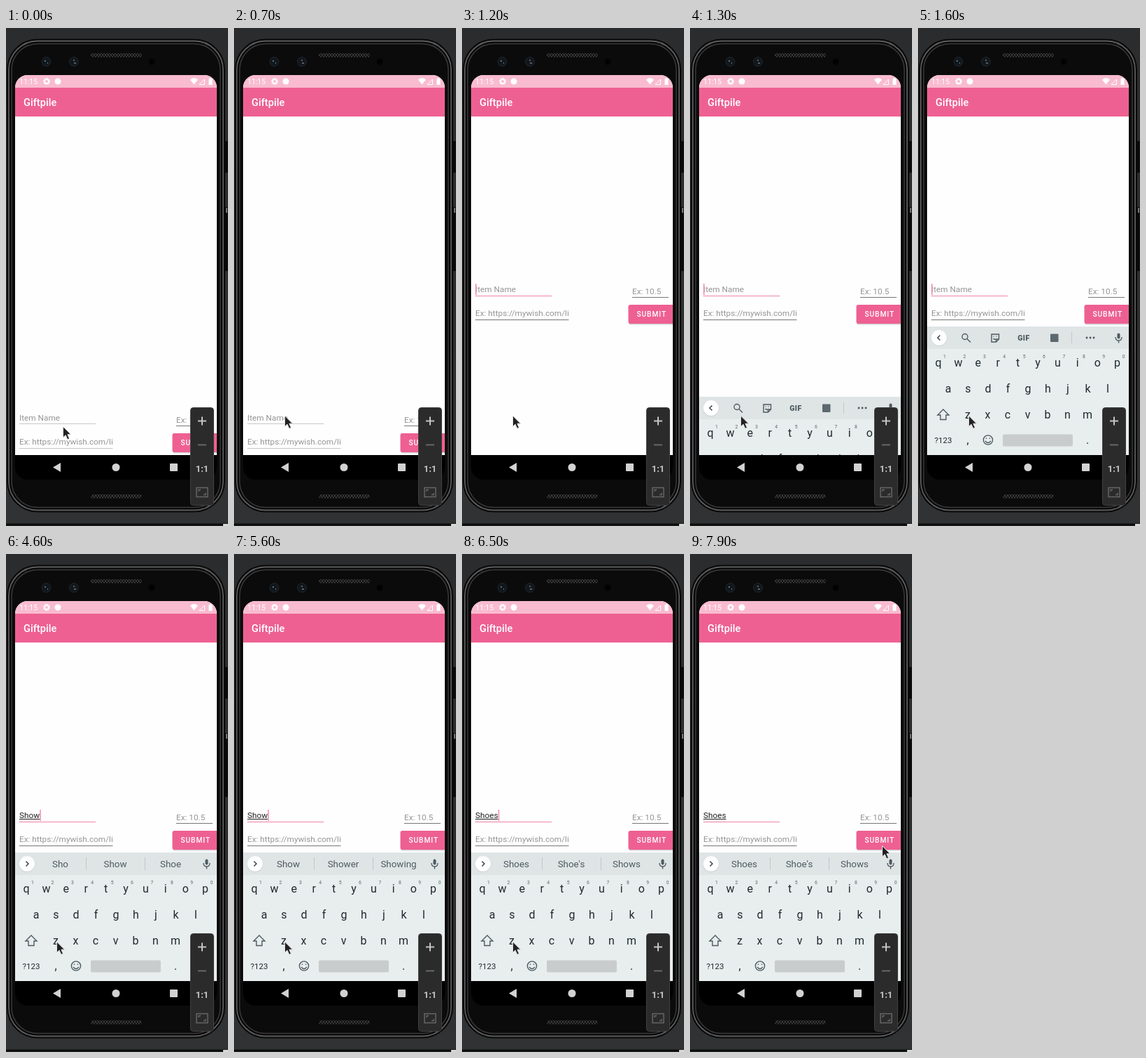
An HTML page that plays this animation: 317x709 px, repeating every 8000 ms.

```html
<!DOCTYPE html>
<html lang="en">
<head>
<meta charset="utf-8">
<style>
html, body { margin: 0; width: 100%; height: 100%; overflow: hidden; background: #2c2d2e; }
svg { display: block; width: 100%; height: 100%; }
text { font-family: Roboto, sans-serif; white-space: pre; }
.field { font-size: 11.8px; fill: #959595; }
.key { font-size: 16px; fill: #1f2b30; text-anchor: middle; }
.hint { font-size: 6.8px; fill: #5c696e; text-anchor: middle; }
.word { font-size: 13.4px; fill: #4d5b61; text-anchor: middle; }
.line { fill: none; stroke: #4d5b61; stroke-width: 1.4; }
</style>
</head>
<body>
<svg viewBox="0 0 317 709">
  <defs>
    <clipPath id="screen"><path d="M13 608V85a18 18 0 0 1 18-18H283a18 18 0 0 1 18 18V608z"/></clipPath>
    <clipPath id="urlBox"><rect x="19" y="575" width="133.5" height="30"/></clipPath>
    <pattern id="grille" width="4" height="5" patternUnits="userSpaceOnUse" y="1">
      <path d="M0 0L4 5M4 0L0 5" stroke="#505050" stroke-width=".8"/>
    </pattern>
    <linearGradient id="backdrop" x2="0" y2="1">
      <stop stop-color="#2b2c2d"/><stop offset="1" stop-color="#303233"/>
    </linearGradient>
  </defs>

  <!-- phone body -->
  <rect width="317" height="709" fill="url(#backdrop)"/>
  <path d="M0 707H317" stroke="#0c0c0c" stroke-width="3"/>
  <path d="M310 707.5h7" stroke="#d8d8d8" stroke-width="3"/>
  <path d="M314.5 161v45M314.5 255v91" stroke="#080808" stroke-width="4"/>
  <path d="M315 256v7" stroke="#777" stroke-width="2"/>
  <rect x="1" y="15.500" width="312" height="674" rx="44" fill="#080808"/>
  <rect x="4" y="18.500" width="306" height="668" rx="41" fill="none" stroke="#5c5c5c" stroke-width="1.800"/>
  <rect x="8" y="22.500" width="298" height="660" rx="37" fill="#0b0b0b" stroke="#3a3a3a" stroke-width="1.500"/>
  <rect x="121" y="36" width="73" height="5.500" rx="2.700" fill="url(#grille)"/>
  <rect x="121" y="664" width="73" height="5.500" rx="2.700" fill="url(#grille)"/>
  <g stroke="#20262b">
    <circle cx="57.500" cy="48" r="6.500" fill="#11171c"/>
    <circle cx="97" cy="48" r="6.500" fill="#11171c"/>
    <circle cx="208" cy="48" r="4.500" fill="#020202" stroke="#070707"/>
  </g>
  <path d="M55 47h2m2 3h1" stroke="#5b7181" stroke-width="2"/>
  <path d="M96 46h2m-1 4h3" stroke="#777" stroke-width="1.500"/>
  <path d="M13 600H301V625a18 18 0 0 1-18 18H31a18 18 0 0 1-18-18z"/>

  <!-- app screen -->
  <g clip-path="url(#screen)">
    <rect x="13" y="67" width="288" height="541" fill="#fefefe"/>
    <rect x="13" y="84" width="288" height="42" fill="#ee6092"/>
    <rect x="13" y="67" width="288" height="18" fill="#f9bbd0"/>
    <g fill="#fff">
      <text x="19" y="80" font-size="10.500">11:15</text>
      <circle cx="58" cy="76" r="3" fill="none" stroke="#fff" stroke-width="2"/>
      <circle cx="58" cy="76" r="4.200" fill="none" stroke="#fff" stroke-width="1.500" stroke-dasharray="1.700 1.600"/>
      <circle cx="74" cy="76" r="4.500"/>
      <path d="M263 73.500q5.500-4.500 11 0l-5.500 7z"/>
      <path d="M276 80.500h7.500v-7.500z" fill="none" stroke="#fff"/>
      <path d="M289.500 72h1.500v-1h2v1h1.500v9h-5z"/>
      <text x="25" y="111" font-size="14.600" font-weight="500">Giftpile</text>
    </g>
    <g id="form">
      <text id="itemHint" class="field" x="19" y="559">Item Name</text>
      <text id="item" class="field" x="19" y="559" style="fill:#222"></text>
      <path id="itemMark" stroke="#222"/>
      <path id="itemLine" d="M19 563.500H128"/>
      <path id="caret" stroke="#f490b0" stroke-width="1.600"/>
      <text class="field" x="243" y="562">Ex: 10.5</text>
      <path d="M243 566.500H295" stroke="#777"/>
      <text class="field" x="19" y="593" clip-path="url(#urlBox)">Ex: https://mywish.com/list</text>
      <path id="urlLine" d="M19 598.500H152.500"/>
      <rect x="238" y="578.500" width="70" height="27" rx="3" fill="#d4d4d4"/>
      <rect x="237.500" y="577" width="70" height="27" rx="3" fill="#ee6092"/>
      <text x="249.500" y="594" font-size="10.200" font-weight="500" letter-spacing=".91" fill="#fff">SUBMIT</text>
    </g>

    <g id="keyboard">
      <rect x="13" y="425" width="288" height="184" fill="#e8eded"/>
      <rect x="13" y="425" width="288" height="32" fill="#dfe4e5"/>
      <circle cx="30" cy="441.500" r="11.500" fill="#cdd2d3"/>
      <circle cx="30" cy="441" r="11" fill="#fff"/>
      <path id="chevron" fill="none" stroke="#3c484d" stroke-width="1.500"/>
      <g id="tools">
        <circle class="line" cx="67" cy="439.500" r="4"/>
        <path class="line" d="M70 442.500l5 5"/>
        <path class="line" d="M105 436h10.500v7l-4 4h-6.500zM111.500 447v-4h4M108 438.500v1m4-1v1M107.500 442q2 2 3.500 1"/>
        <text x="151" y="445" font-size="10.500" font-weight="900" text-anchor="middle" letter-spacing=".5" fill="#4d5b61">GIF</text>
        <rect x="189" y="435.500" width="11.500" height="11.500" rx="1" fill="#5b686d"/>
        <path d="M219.500 433v16" stroke="#c2c8ca"/>
        <path d="M241 441h.1m4.900 0h.1m4.900 0h.1" stroke="#4d5b61" stroke-width="2.800" stroke-linecap="round"/>
      </g>
      <g id="words">
        <path d="M114.500 432v18M198.500 432v18" stroke="#c2c8ca"/>
        <text class="word" x="77.500" y="446"></text>
        <text class="word" x="156" y="446"></text>
        <text class="word" x="235" y="446"></text>
      </g>
      <rect x="284.500" y="434.500" width="4" height="8" rx="2" fill="#4d5b61"/>
      <path class="line" d="M282 440q0 5 4.500 5t4.500-5M286.500 445v3.500"/>
      <g id="keys"></g>
      <path class="line" d="M36 543l8 8h-4v6.500h-8v-6.500h-4z"/>
      <text class="key" x="36" y="591" style="font-size:11.500px">?123</text>
      <circle class="line" cx="100" cy="586.500" r="6.600"/>
      <path class="line" d="M97.500 583.500v1.500m5-1.500v1.500M96 588q4 5 8 0"/>
      <rect x="121" y="578.500" width="100" height="17" rx="2" fill="#c8cccd"/>
    </g>
  </g>

  <!-- navigation bar -->
  <g fill="#d2d2d2">
    <path d="M67 625.500l11-6.500v13z"/>
    <circle cx="157" cy="625.500" r="5.500"/>
    <rect x="234" y="620" width="11" height="11" rx="1"/>
  </g>

  <!-- zoom panel -->
  <rect x="263.500" y="540.500" width="33" height="139" rx="4" fill="#2b2b2b" stroke="#414141"/>
  <path d="M274 559.500h12M280 553.500v12" stroke="#c4c4c4" stroke-width="2"/>
  <path d="M274 593.500h12" stroke="#666" stroke-width="2"/>
  <text x="280" y="632" font-size="13" font-weight="700" text-anchor="middle" fill="#c4c4c4">1:1</text>
  <path d="M272 654.500h16v13h-16zM275 660v-2.500h3M285 662v2.500h-3" fill="none" stroke="#666" stroke-width="1.500"/>

  <path id="pointer" d="M0 0V15.500L3.600 12.200L6.300 18.300L9 17.100L6.400 11.200H11.200Z" fill="#222" stroke="#e4e4e4" stroke-width="1"/>
</svg>
<script>
const LOOP = 8000, STEP = 100;
const $ = id => document.getElementById(id);
const set = (id, attrs) => {
  for (const name in attrs) $(id).setAttribute(name, attrs[name]);
};
const show = (id, on) => set(id, { visibility: on ? 'visible' : 'hidden' });
const latest = (list, t) => list.filter(([start]) => t >= start).pop()?.[1];
const progress = (t, from, to) => Math.min(1, Math.max(0, (t - from) / (to - from)));

const typed = [[0, ''], [4000, 'S'], [4200, 'Sh'], [4300, 'Sho'], [4600, 'Show'],
  [5700, 'Sho'], [6100, 'Shoe'], [6500, 'Shoes']];
const suggestions = [[4000, 'S So Some'], [4200, 'Sh She Show'], [4300, 'Sho Show Shoe'],
  [4800, 'Show Shower Showing'], [5700, 'Sho Show Shoe'], [6300, 'Shoe Shoes Shop'],
  [6500, "Shoes Shoe's Shows"]];
const caretOn = [[900, 1700], [2100, 2700], [3100, 3600], [4000, 5100], [5600, 7000], [7500, 7900]];
const keyboardDrop = [[0, 190], [1300, 100], [1400, 10], [1600, 0]];
const wordSlots = document.querySelectorAll('.word');

function keyRow(letters, x, y, gap, hints) {
  return [...letters].map((letter, i) => {
    const cx = x + i * gap;
    const hint = hints ? `<text class="hint" x="${cx + 9}" y="470">${(i + 1) % 10}</text>` : '';
    return `<text class="key" x="${cx}" y="${y}">${letter}</text>${hint}`;
  }).join('');
}
$('keys').innerHTML = keyRow('qwertyuiop', 29, 481.5, 28.4, true) +
  keyRow('asdfghjkl', 43, 518.5, 28.5) + keyRow('zxcvbnm', 71, 555.5, 28.5) +
  keyRow(',.', 71, 591.5, 171);

function pointerAt(t) {
  const first = progress(t, 100, 700), second = progress(t, 7200, 7900);
  const ease = second * second * (3 - 2 * second);
  return [81.5 - 9 * first + 202 * ease, 567.5 - 15.5 * first - 136.5 * ease];
}

function draw(t) {
  const focused = t >= 900, raised = t >= 1100;
  const text = latest(typed, t), words = latest(suggestions, t);

  set('form', { transform: `translate(0 ${raised ? -183 : 0})` });
  set('itemLine', { stroke: focused ? '#f7b5ca' : '#c6c6c6', 'stroke-width': focused ? 1.8 : 1,
    transform: `translate(0 ${focused ? 1 : 0})` });
  set('urlLine', { stroke: raised ? '#777' : '#c6c6c6' });

  $('item').textContent = text;
  show('itemHint', !text);
  const end = 19 + (text ? $('item').getComputedTextLength() : 0);
  set('itemMark', { d: `M19 560.500H${end}` });
  show('itemMark', text);
  set('caret', { d: `M${end + 0.9} 547V563` });
  show('caret', caretOn.some(([from, to]) => t >= from && t < to));

  set('keyboard', { transform: `translate(0 ${latest(keyboardDrop, t)})` });
  show('tools', !words);
  show('words', words);
  set('chevron', { d: words ? 'M28.500 437.500l3.500 3.500-3.500 3.500' : 'M31.500 437.500l-3.500 3.500 3.500 3.500' });
  if (words) words.split(' ').forEach((word, i) => wordSlots[i].textContent = word);

  set('pointer', { transform: `translate(${pointerAt(t)})` });
}

function tick() {
  const t = performance.now() % LOOP;
  draw(Math.floor(t / STEP) * STEP);
  requestAnimationFrame(tick);
}
tick();
</script>
</body>
</html>
```
